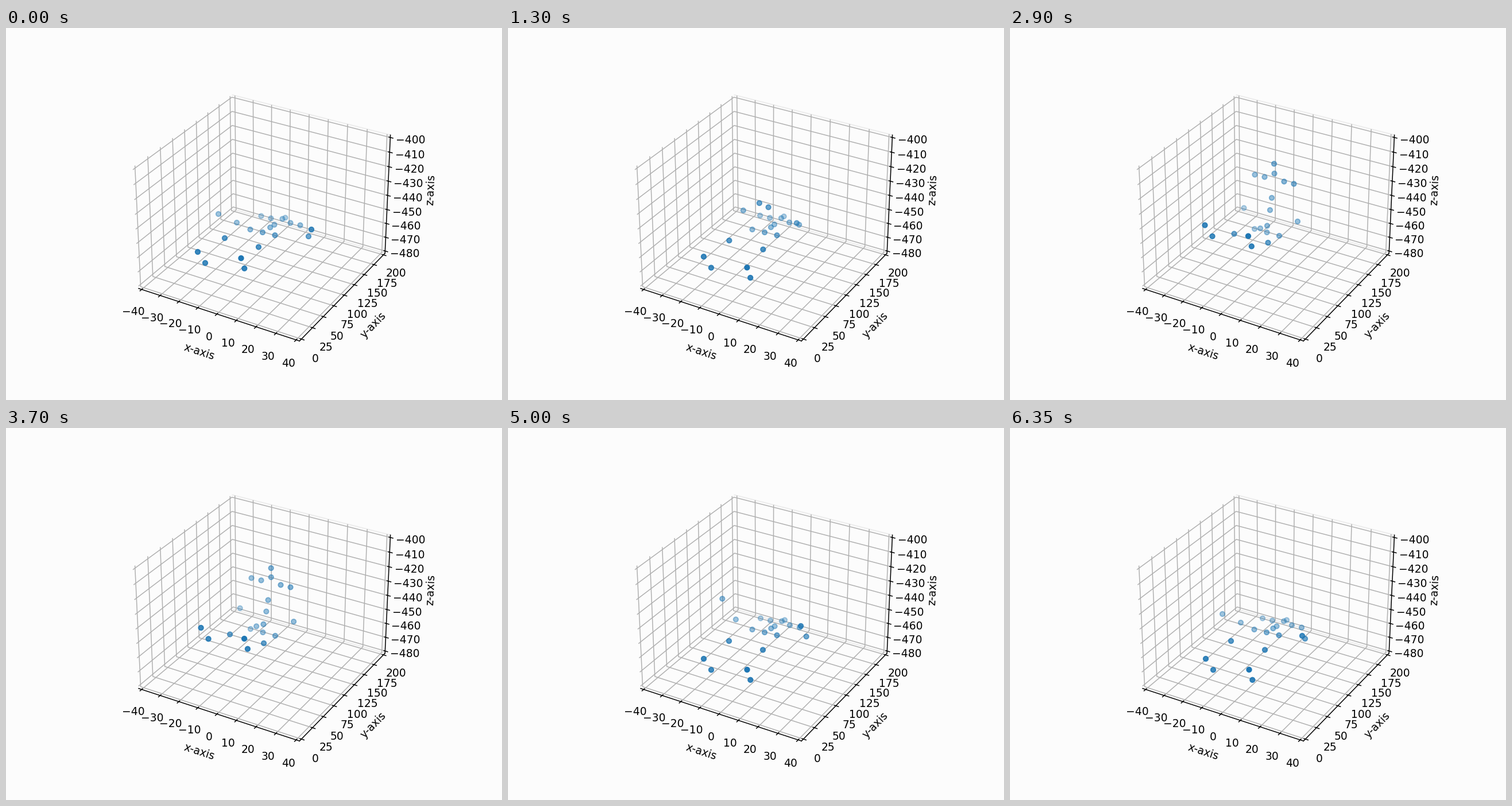
A matplotlib script that plays this animation: 864x648 px, repeating every 6400 ms.

```python
import numpy as np
import matplotlib.pyplot as plt
from matplotlib.animation import FuncAnimation

W, H, DPI = 864, 648, 135
FRAMES, STEP = 128, 50
PAPER = "#fcfcfc"
BLUE = (0x1F / 255, 0x77 / 255, 0xB4 / 255)


def vec(x, y, opacity=0):
    return np.array([x, y, opacity], float)


def mix(a, b, k):
    return a + (b - a) * k


def arc(a, bend, b, k):
    """Quadratic curve from a to b, pulled towards bend."""
    return mix(mix(a, bend, k), mix(bend, b, k), k)


def ramp(t, start, end):
    u = np.clip((t - start) / (end - start), 0, 1)
    return u * u * (3 - 2 * u)


def joints(t):
    """Rows of x, y, opacity for a figure doing one sit-up."""
    sit = ramp(t, 1200, 1850) - ramp(t, 3540, 4480)
    reach = ramp(t, 0, 700) - ramp(t, 4200, 5350)
    slack = 1 - ramp(t, 0, 700)

    # Legs: the right one is the left one moved across the body.
    ankle = mix(vec(341, 402, .88), vec(339.5, 343.5, .88), sit) + slack * vec(-7, -12)
    knee = mix(vec(385, 371, .75), vec(390.5, 358.5, .65), sit) + slack * vec(-4, -5)
    other = ankle + vec(75.5, 19 - 8 * slack, .12)
    rows = [ankle, ankle + vec(13, 19.3, -.03),
            other, other + vec(5.8, 17.8, -.1),
            knee, knee + vec(59, 15.5, .04)]

    # Trunk: a line from hip to chest with hips and shoulders across it.
    hip = mix(vec(447, 356, .54), vec(447.5, 356, .43), sit)
    chest = mix(vec(474, 339.5, .39), vec(460.5, 263.5, .5), sit) + slack * vec(4.5, -4)
    hip_side = vec(21.5, 5 + sit, .07)
    shoulder_side = vec(34, 8, .06)
    rows += [hip + k * hip_side for k in (-1, 0, 1)]
    rows += [mix(hip, chest, k) for k in (.42, .65)]
    rows += [chest + k * shoulder_side for k in (-1, -.5, .5, 1)]
    rows += [chest + mix(vec(3, -3), vec(0, -10), sit),
             chest + mix(vec(8, -5, -.05), vec(-.5, -27, .05), sit)]

    # Arms: from the floor over the body, then down with the sit-up.
    def limb(rest, bend, front, sat):
        return mix(arc(rest, bend, front, reach), sat, sit)

    swing = vec(630, 315, .75) if t < 3000 else vec(520, 320, .8)
    rows += [
        limb(vec(402, 339, .42), vec(386, 326, .42), vec(410, 318, .48), vec(407.5, 313.5, .33)),
        limb(vec(370, 324, .42), vec(370, 250, .6), vec(438, 302, .68), vec(436, 349, .42)),
        limb(vec(514, 367, .65) + slack * vec(13, -4), vec(532, 360, .6),
             vec(503, 340, .6), vec(501, 337, .45)),
        limb(vec(509, 362, .83) + slack * vec(23, -11), swing,
             vec(454, 310, .68), vec(448, 344.5, .48)),
    ]
    rows = np.array(rows)
    return rows[np.argsort(rows[:, 2])]


def padded(low, high):
    pad = (high - low) / 48
    return low - pad, high + pad


plt.rcParams["font.family"] = "DejaVu Sans"
fig = plt.figure(figsize=(W / DPI, H / DPI), dpi=DPI, facecolor=PAPER)

ax = fig.add_subplot(projection="3d", facecolor=PAPER)
ax.set(xlim=padded(-40, 40), ylim=padded(0, 200), zlim=padded(-480, -400),
       xticks=range(-40, 41, 10), yticks=range(0, 201, 25),
       zticks=range(-480, -399, 10),
       xlabel="x-axis", ylabel="y-axis", zlabel="z-axis")
for axis, edge in ((ax.xaxis, "none"), (ax.yaxis, "#ececec"), (ax.zaxis, "none")):
    axis.pane.set_alpha(1)
    axis.pane.set_facecolor("none")
    axis.pane.set_edgecolor(edge)

layer = fig.add_axes((0, 0, 1, 1))
layer.set(xlim=(0, W), ylim=(H, 0))
layer.axis("off")
start = joints(0)
dots = layer.scatter(start[:, 0], start[:, 1], s=20, linewidths=1)


def draw(frame):
    rows = joints(frame * STEP)
    colors = [(*BLUE, a) for a in np.clip(rows[:, 2], 0, 1)]
    dots.set_offsets(rows[:, :2])
    dots.set_facecolor(colors)
    dots.set_edgecolor(colors)
    return [dots]


anim = FuncAnimation(fig, draw, frames=FRAMES, interval=STEP,
                     repeat=True, repeat_delay=0)
plt.show()
```
